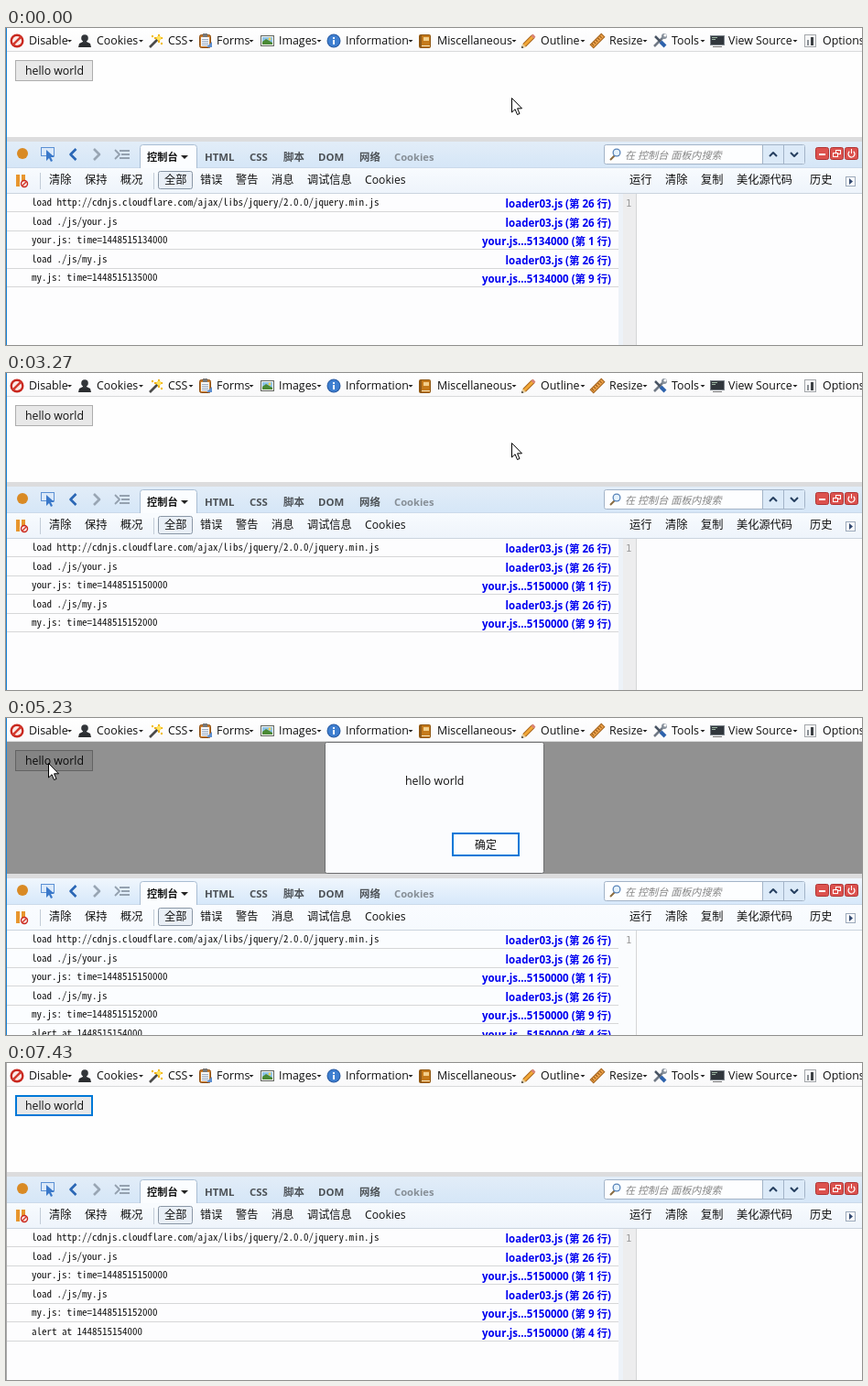
An HTML page with a canvas that plays this animation: 935x346 px, repeating every 7530 ms.

```html
<!DOCTYPE html>
<html lang="zh-CN">
<head>
<meta charset="utf-8">
<title>Script loader console</title>
<style>
html, body { margin: 0; width: 100%; height: 100%; overflow: hidden; background: #fff; }
canvas { display: block; width: 935px; height: 346px; }
</style>
</head>
<body>
<canvas id="stage" width="935" height="346"></canvas>
<script>
const ctx = document.getElementById('stage').getContext('2d');
const W = 935, H = 346, LOOP = 7530;
const SANS = '"Open Sans", "Noto Sans", "Noto Sans CJK SC", sans-serif';
const MONO = '"Noto Sans Mono CJK SC", "DejaVu Sans Mono", monospace';

// Console text advances 5.5px per character.
ctx.font = `100px ${MONO}`;
const monoSize = 550 / ctx.measureText('0').width;

// ---- drawing helpers ----
function rect(x, y, w, h, color) {
  ctx.fillStyle = color;
  ctx.fillRect(x, y, w, h);
}

function frame(x, y, w, h, fill, border, width = 1) {
  rect(x, y, w, h, border);
  rect(x + width, y + width, w - 2 * width, h - 2 * width, fill);
}

function gradient(y, h, top, bottom) {
  const g = ctx.createLinearGradient(0, y, 0, y + h);
  g.addColorStop(0, top);
  g.addColorStop(1, bottom);
  rect(0, y, W, h, g);
}

function trace(points) {
  ctx.beginPath();
  for (let i = 0; i < points.length; i += 2) ctx.lineTo(points[i], points[i + 1]);
}

function line(points, color, width = 1) {
  trace(points);
  ctx.strokeStyle = color;
  ctx.lineWidth = width;
  ctx.stroke();
}

function poly(points, color) {
  trace(points);
  ctx.closePath();
  ctx.fillStyle = color;
  ctx.fill();
}

function disc(x, y, r, color) {
  ctx.beginPath();
  ctx.arc(x, y, r, 0, 7);
  ctx.fillStyle = color;
  ctx.fill();
}

function round(x, y, w, h, r, fill, border) {
  ctx.beginPath();
  ctx.roundRect(x + .5, y + .5, w - 1, h - 1, r);
  ctx.fillStyle = fill;
  ctx.fill();
  ctx.strokeStyle = border;
  ctx.lineWidth = 1;
  ctx.stroke();
}

function text(s, x, y, size, color = '#111', style = '', family = SANS) {
  ctx.font = `${style} ${size}px ${family}`;
  ctx.fillStyle = color;
  ctx.fillText(s, x, y);
}

function textRight(s, x, y, size, color, style) {
  ctx.textAlign = 'right';
  text(s, x, y, size, color, style);
  ctx.textAlign = 'left';
}

function dropArrow(x, y, r, color) {
  poly([x - r, y, x + r, y, x, y + r], color);
}

function at(x, y, angle, draw) {
  ctx.save();
  ctx.translate(x, y);
  ctx.rotate(angle);
  draw();
  ctx.restore();
}

function noEntry(x, y, r, width) {
  disc(x, y, r, '#c9281f');
  disc(x, y, r - width, '#fbe9e6');
  const d = r * .62;
  line([x - d, y + d, x + d, y - d], '#d3382c', width);
}

// ---- menu icons, centred on the origin ----
const icons = {
  disable() { noEntry(0, 0, 7.5, 2.4); },
  person() {
    poly([-7, 7, -6, 3, -2, 1, 2, 1, 6, 3, 7, 7], '#2b2d30');
    rect(-2, -1, 4, 4, '#33363a');
    disc(0, -3, 3.8, '#33363a');
  },
  wand() {
    line([-7, 7, 3, -3], '#4a4a4a', 2.6);
    line([3, -7, 3, 2], '#f0b010', 2);
    line([-2, -3, 7, -3], '#f0b010', 2);
    disc(3, -3, 2.6, '#ffe25c');
    disc(-4, -5, 1.2, '#f2bd20');
    disc(6, 3, 1.2, '#f2bd20');
  },
  clipboard() {
    round(-7, -7, 13, 15, 2, '#c77a2b', '#8d4f14');
    rect(-5, -4, 9, 10, '#f7f8fb');
    rect(-3, -8, 5, 4, '#777');
    for (let y = -2; y < 5; y += 2) rect(-4, y, 7, 1, '#9aabc2');
    poly([1, 7, 7, 1, 7, 7], '#5c8ed0');
  },
  picture() {
    frame(-7, -6, 15, 12, '#f7f7f3', '#62665f');
    rect(-5, -4, 11, 8, '#8ec3e8');
    poly([-5, 4, -5, 1, -1, -2, 6, 2, 6, 4], '#4b8a35');
    disc(3, -2, 1.4, '#f6d550');
  },
  info() {
    disc(0, 0, 7.5, '#2a5da5');
    disc(0, 0, 6.4, '#3f7fd0');
    rect(-1, -4, 2, 2, '#fff');
    rect(-1, -1, 2, 5, '#fff');
  },
  book() {
    round(-6, -7, 13, 15, 1, '#c57a1b', '#8f5610');
    rect(-5, -6, 2, 13, '#8f5a18');
    rect(-1, -4, 6, 4, '#f3cf8a');
    rect(-3, 5, 9, 1, '#f6e5c0');
  },
  pencil() {
    line([-5, 5, 5, -5], '#a8641a', 5);
    line([-5, 5, 5, -5], '#f2a838', 3);
    line([4, -4, 6, -6], '#d98276', 4);
    poly([-8, 8, -7, 3, -3, 7], '#e8cf9e');
    poly([-8, 8, -7.5, 5.5, -5.5, 7.5], '#333');
  },
  ruler() {
    at(0, 0, -Math.PI / 4, () => {
      frame(-9, -3, 18, 6, '#eda24b', '#a5631b');
      for (let x = -7; x < 8; x += 3) rect(x, -2, 1, 3, '#8f5718');
    });
  },
  tools() {
    line([-6, 6, 5, -5], '#707985', 2.5);
    line([-5, -5, 1, 1], '#4a5564', 2.5);
    line([1, 1, 6, 6], '#2d62ac', 4);
    disc(5, -5, 3, '#88919c');
    disc(6, -6, 1.6, '#fff');
  },
  screen() {
    frame(-8, -6, 16, 11, '#30363c', '#7b8289');
    rect(-6, -4, 6, 1, '#9fb9a5');
    rect(-6, -2, 4, 1, '#9fb9a5');
    rect(-5, 6, 10, 1, '#777');
  },
  options() {
    frame(-7, -7, 13, 14, '#f6f6f7', '#a3a6aa');
    rect(-4, -1, 2, 6, '#8b9096');
    rect(0, -4, 3, 9, '#3c4044');
  }
};

// icon, icon x, label, label x, arrow x
const menu = [
  ['disable', 12, 'Disable', 25, 69.5], ['person', 86, 'Cookies', 99, 147.5],
  ['wand', 164, 'CSS', 177, 202], ['clipboard', 218, 'Forms', 230, 268],
  ['picture', 285, 'Images', 298, 342], ['info', 358, 'Information', 371, 442],
  ['book', 457, 'Miscellaneous', 471, 555], ['pencil', 571, 'Outline', 584, 630],
  ['ruler', 646, 'Resize', 659, 698], ['tools', 714, 'Tools', 727, 761],
  ['screen', 777, 'View Source', 789, 862], ['options', 879, 'Options', 892, 950]
];

function drawMenu() {
  gradient(0, 25, '#ffffff', '#f9f9fa');
  rect(0, 25, W, 1, '#d9dadb');
  for (const [icon, ix, label, x, ax] of menu) {
    at(ix, 14, 0, icons[icon]);
    text(label, x, 18, 12.4);
    dropArrow(ax, 13, 2.5, '#222');
  }
}

// ---- page ----
const buttonLooks = {
  normal: ['#e8e8e8', '#adadad', 1],
  hover: ['#e5f1fb', '#0078d7', 1],
  pressed: ['#cce4f7', '#005499', 1],
  focus: ['#e8e8e8', '#0078d7', 2],
  confirm: ['#fcfdfe', '#0078d7', 2]
};

function button(x, y, w, h, look) {
  frame(x, y, w, h, ...buttonLooks[look]);
}

function drawPage(s) {
  rect(0, 26, W, 144, '#fefefe');
  button(10, 35, 85, 23, s.button);
  text('hello world', s.button === 'pressed' ? 22 : 21, 51, 12.3);
  if (s.status) {
    frame(0, 97, 265, 22, '#f9f9f9', '#d4d4d4');
    text(s.status, 5, 113, 12.1, '#333');
  }
  if (s.dialog) drawDialog(s);
}

function drawDialog(s) {
  rect(0, 26, W, 144, 'rgba(0,0,0,.43)');
  round(348, 26, 240, 144, 2, '#fbfcfe', '#6c6d6f');
  if (s.footer) {
    rect(349, 110, 238, 59, '#f8f9fb');
    rect(349, 110, 238, 1, '#dddfe1');
  }
  text('hello world', 436, 73, 12.4);
  button(487, 125, 74, 26, s.confirm);
  text('确定', 512, 142.5, 12);
}

// ---- developer panel, drawn from its splitter down ----
const tabs = [['HTML', 217], ['CSS', 266], ['脚本', 303], ['DOM', 341], ['网络', 386]];
const tools = [['清除', 47], ['保持', 86], ['概况', 125], ['全部', 173], ['错误', 212],
  ['警告', 251], ['消息', 290], ['调试信息', 329], ['Cookies', 392], ['运行', 681],
  ['清除', 720], ['复制', 759], ['美化源代码', 798], ['历史', 878]];

const normalTheme = { tabs: ['#e2edf8', '#d5e6f7'], tools: ['#f8fbfe', '#eef4fb'],
  split: '#edf2f8', gutter: '#ededee', body: '#fdfdfe' };
const dialogTheme = { tabs: ['#f0f6fd', '#d6e8fa'], tools: ['#fafcff', '#f6fafe'],
  split: '#fafcfe', gutter: '#fafcfe', body: '#fbfdff' };

function drawTabs(theme) {
  gradient(5, 29, ...theme.tabs);
  rect(0, 33, W, 1, '#cbdaea');
  disc(18, 18, 6, '#d98a24');

  ctx.lineJoin = 'round';
  frame(38, 11, 15, 10, '#dbe9f9', '#5b90d4');
  poly([44, 14, 44, 26, 47, 23, 49, 27, 51, 26, 49, 22, 53, 22], '#3a78c9');
  line([76.5, 13, 70.5, 19, 76.5, 25], '#2a66b5', 2.6);
  line([96, 13, 102, 19, 96, 25], '#98a5b3', 2.6);
  line([119, 14, 124, 19, 119, 24], '#94a1af', 1.8);
  [14, 18, 22].forEach((y, i) => rect(124 + i % 2 * 2, y, 11 - i % 2 * 2, 2, '#94a1af'));

  round(146, 8, 63, 32, 3, '#fbfdff', '#a9bdd3');
  text('控制台', 154, 26, 11.2, '#111', 'bold');
  dropArrow(195, 20, 4, '#222');
  for (const [label, x] of tabs) text(label, x, 26, 11.4, '#4d5257', 'bold');
  text('Cookies', 424, 26, 11.2, '#868e96', 'bold');

  round(653, 8, 220, 22, 2, '#fdfeff', '#a3b4c8');
  rect(827, 9, 45, 20, '#dceaf8');
  rect(826, 9, 1, 20, '#a3b4c8');
  rect(849, 9, 1, 20, '#a3b4c8');
  line([834, 21, 838, 17, 842, 21], '#263f60', 2);
  line([857, 17, 861, 21, 865, 17], '#263f60', 2);
  line([660, 25, 665, 20], '#8b6c40', 2);
  disc(667, 17, 4.5, '#5984b8');
  disc(667, 17, 3.2, '#e5f2fd');
  text('在 控制台 面板内搜索', 676, 24, 11.1, '#858585', 'italic');

  for (const x of [884, 900, 916]) round(x, 11, 15, 14, 2, '#dc524e', '#b03434');
  rect(888, 18, 7, 2, '#fff');
  frame(906, 14, 6, 5, '#dc524e', '#fff');
  frame(903, 17, 6, 5, '#dc524e', '#fff');
  ctx.beginPath();
  ctx.arc(923.5, 18.5, 3.5, -.9, 4.05);
  ctx.strokeStyle = '#fff';
  ctx.lineWidth = 1.3;
  ctx.stroke();
  rect(923, 13, 1, 5, '#fff');
}

function drawTools(theme) {
  gradient(34, 27, ...theme.tools);
  rect(147, 33, 61, 1, '#fbfdff');
  rect(147, 34, 61, 6, theme.tools[0]);
  rect(0, 61, W, 1, '#cbd4de');
  rect(11, 41, 4, 13, '#e8962e');
  rect(17, 41, 4, 13, '#e8962e');
  noEntry(20, 51, 4.2, 1.4);
  rect(37, 39, 1, 18, '#c2ccd7');
  rect(161, 39, 1, 18, '#c2ccd7');
  round(166, 37, 38, 20, 2, '#e9eff6', '#8a97a6');
  for (const [label, x] of tools) text(label, x, 51, 12.2);
  frame(917, 43, 11, 11, '#f9fbfe', '#9ca9ba');
  poly([921, 45, 921, 52, 925, 48.5], '#344a70');
}

function drawLogs(run, count) {
  const stamp = n => `14485151${n}000`;
  const src = `your.js...51${run.base}000`;
  const rows = [
    ['load http://cdnjs.cloudflare.com/ajax/libs/jquery/2.0.0/jquery.min.js', 'loader03.js', 26],
    ['load ./js/your.js', 'loader03.js', 26],
    ['your.js: time=' + stamp(run.base), src, 1],
    ['load ./js/my.js', 'loader03.js', 26],
    ['my.js: time=' + stamp(run.end), src, 9],
    ['alert at ' + stamp(54), src, 4]
  ];
  rows.slice(0, count).forEach(([msg, file, no], i) => {
    const y = Math.round(61 + 20.6 * i);
    text(msg, 28, y + 14, monoSize, '#111', '', MONO);
    textRight(`${file} (第 ${no} 行)`, 661, y + 16, 11.5, '#0000f0', 'bold');
    rect(0, y + 20, 669, 1, '#d6d7d8');
  });
}

function drawPanel(s) {
  const theme = s.dialog ? dialogTheme : normalTheme;
  ctx.save();
  ctx.translate(0, s.dialog ? 170 : 119);
  rect(0, 0, W, 5, '#dcdcdd');
  drawTabs(theme);
  drawTools(theme);
  rect(0, 62, W, H, theme.body);
  drawLogs(s.run, s.rows);
  rect(669, 62, 5, H, theme.split);
  rect(674, 62, 14, H, theme.gutter);
  rect(688, 62, 1, H, '#d5d6d7');
  text('1', 677, 76, 10.5, '#9a9a9a', '', '"DejaVu Sans Mono", monospace');
  ctx.restore();
}

// ---- pointer ----
function drawArrow(x, y) {
  at(x + .5, y + .5, 0, () => {
    const shape = [0, 0, 0, 15.5, 3.6, 12.2, 6, 18, 8.5, 17, 6.1, 11.3, 11, 11.3, 0, 0];
    poly(shape, '#fff');
    line(shape, '#000');
  });
}

function drawBeam(x, y) {
  rect(x + 3, y + 1, 1, 14, '#222');
  for (const end of [y, y + 15]) {
    rect(x, end, 3, 1, '#222');
    rect(x + 4, end, 3, 1, '#222');
  }
}

// ---- timeline: each step changes part of the state ----
const host = 'cdnjs.cloudflare.com';
const receiving = `正在传输来自 ${host} 的数据…`;
const first = { base: 34, end: 35 }, second = { base: 50, end: 52 };
const arrow = (x, y) => ({ pointer: [drawArrow, x, y] });
const beam = (x, y) => ({ pointer: [drawBeam, x, y] });

const steps = [
  [0, { run: first, rows: 5, button: 'normal', edge: '#1883d7', ...arrow(552, 76) }],
  [1000, { run: second, rows: 1, status: receiving }],
  [1130, { rows: 3, status: `已读取 ${host}` }],
  [1560, { status: receiving }],
  [3270, { rows: 5, status: '' }],
  [3980, arrow(402, 62)],
  [4100, arrow(156, 49)],
  [4250, arrow(91, 52)],
  [4400, { button: 'hover', ...arrow(46, 49) }],
  [5090, { button: 'pressed' }],
  [5230, { button: 'normal', rows: 6, dialog: true, confirm: 'confirm' }],
  [5390, arrow(50, 55)],
  [5540, arrow(580, 208)],
  [5690, arrow(556, 180)],
  [5820, arrow(537, 160)],
  [5960, { footer: true, confirm: 'hover', ...arrow(533, 141) }],
  [6200, { confirm: 'pressed' }],
  [6320, { dialog: false, button: 'focus', ...arrow(587, 171) }],
  [6470, beam(803, 285)],
  [6620, beam(855, 331)],
  [6750, { pointer: null }],
  [7430, { edge: '#a9a9a9' }]
];

function stateAt(t) {
  return Object.assign({}, ...steps.filter(step => step[0] <= t).map(step => step[1]));
}

function render(t) {
  const s = stateAt(t);
  drawPage(s);
  drawMenu();
  drawPanel(s);
  rect(0, 0, 1, H, s.edge);
  if (s.pointer) {
    const [draw, x, y] = s.pointer;
    draw(x, y);
  }
}

const start = performance.now();
function tick() {
  render((performance.now() - start) % LOOP);
  requestAnimationFrame(tick);
}
tick();
</script>
</body>
</html>
```
